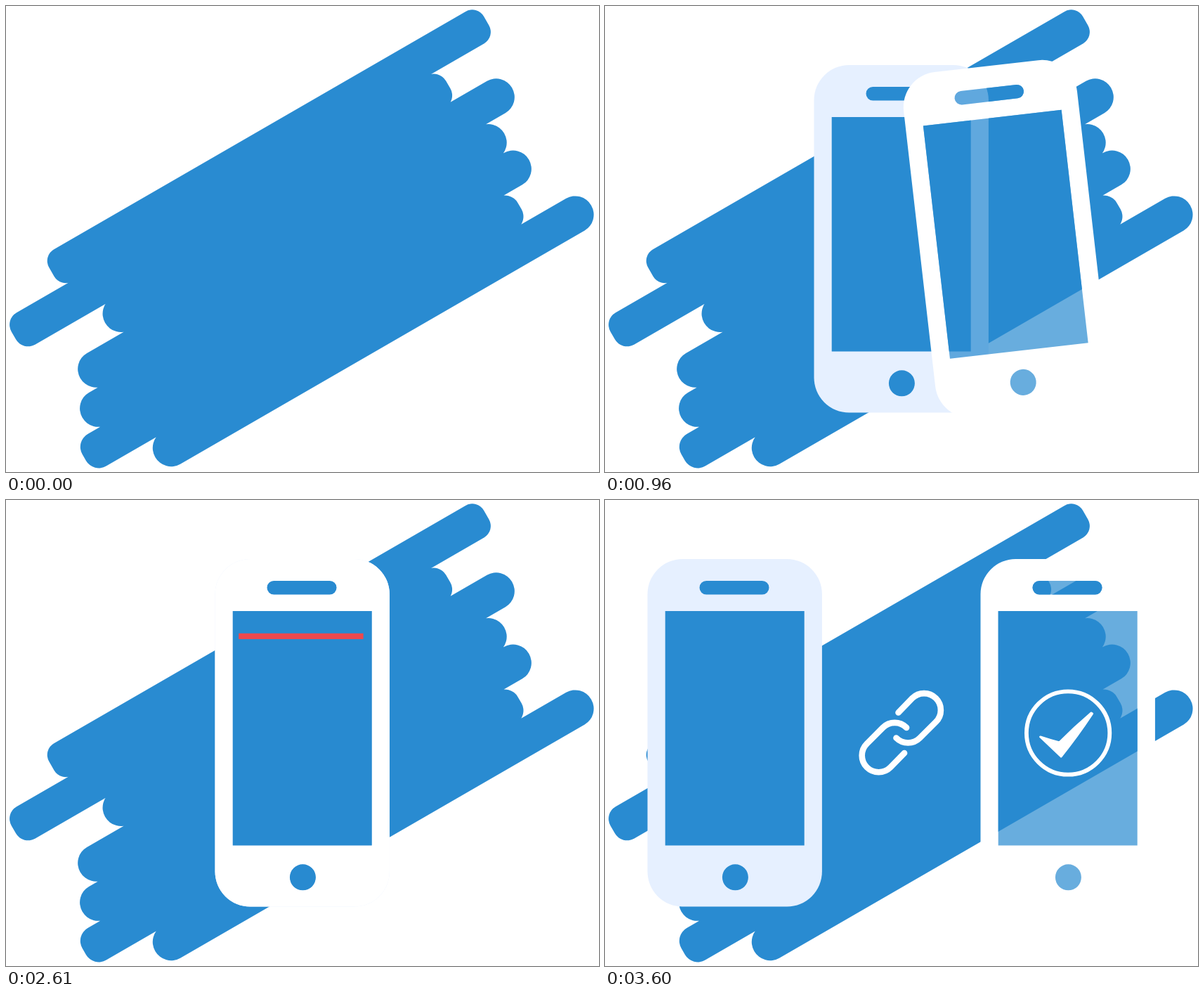
An HTML page with a canvas that plays this animation: 844 px wide and 663 px high, repeating every 4.5 s.

```html
<!DOCTYPE html>
<html lang="en">
<head>
<meta charset="utf-8">
<title>Phone scan</title>
<style>
  html, body { margin: 0; width: 100%; height: 100%; overflow: hidden; background: #fff; }
  canvas { display: block; }
</style>
</head>
<body>
<canvas id="stage" width="844" height="663"></canvas>
<script>
const ctx = document.getElementById('stage').getContext('2d');
const LOOP = 4500, STEP = 30;
const BLUE = '#298bd1', PALE = '#e6f0ff', WHITE = '#fff', RED = '#ff4343';
const CENTER = { x: 421.7, y: 331.2 };
const SPLIT = 237;

// Brush strokes in axes turned by 30 degrees: left, right, top, bottom, corner radius
const STROKES = [
  [-133, 581.5, 333.9, 386.5, 19],
  [-225, 489, 385.3, 437.8, 20],
  [-103.2, 565.5, 434.8, 487.2, 26],
  [-173.2, 523.5, 485.3, 537.7, 26],
  [-198.7, 535.2, 535.3, 587.7, 26],
  [-224.8, 490.8, 585.6, 638.2, 21],
  [-137, 579.5, 635.8, 688.4, 26]
];

const clamp = v => Math.min(1, Math.max(0, v));
const progress = (t, from, to) => clamp((t - from) / (to - from));
const mix = (a, b, p) => a + (b - a) * p;

function place(x, y, angle, alpha, draw) {
  ctx.save();
  ctx.translate(x, y);
  ctx.rotate(angle);
  ctx.globalAlpha = alpha;
  draw();
  ctx.restore();
}

function drawStrokes() {
  ctx.fillStyle = BLUE;
  ctx.beginPath();
  for (const [l, r, t, b, radius] of STROKES) ctx.roundRect(l, t, r - l, b - t, radius);
  ctx.fill();
}

function phoneParts() {
  const parts = new Path2D();
  parts.rect(-99, -173.2, 198, 333.5);
  parts.roundRect(-50.2, -216.2, 99, 19.5, 9.75);
  parts.moveTo(19.2, 205.6);
  parts.arc(0.7, 205.6, 18.5, 0, 2 * Math.PI);
  return parts;
}

const PARTS = phoneParts();
const BODY = new Path2D();
BODY.roundRect(-124.2, -247.2, 248.4, 494.6, 50);
const FRAME = new Path2D(BODY);
FRAME.addPath(PARTS);

function drawSolidPhone() {
  ctx.fillStyle = PALE;
  ctx.fill(BODY);
  ctx.fillStyle = BLUE;
  ctx.fill(PARTS);
}

function drawGlassPhone() {
  ctx.fillStyle = WHITE;
  ctx.fill(FRAME, 'evenodd');
  ctx.globalAlpha = 0.7;
  ctx.fillStyle = BLUE;
  ctx.fill(PARTS);
}

function drawCheck() {
  ctx.strokeStyle = ctx.fillStyle = WHITE;
  ctx.lineWidth = 5.8;
  ctx.beginPath();
  ctx.arc(0, 0, 59.2, 0, 2 * Math.PI);
  ctx.stroke();
  ctx.lineWidth = 3;
  ctx.lineJoin = 'round';
  ctx.beginPath();
  ctx.moveTo(-39.5, 5.5);
  ctx.quadraticCurveTo(-26, 10, -12.5, 13.5);
  ctx.quadraticCurveTo(9, -8, 33, -28.5);
  ctx.lineTo(34.5, -27.5);
  ctx.quadraticCurveTo(13, 5, -10, 33.5);
  ctx.closePath();
  ctx.fill();
  ctx.stroke();
}

function drawLink() {
  ctx.strokeStyle = WHITE;
  ctx.lineWidth = 8.6;
  ctx.lineCap = 'round';
  const q = Math.PI / 4;
  for (let i = 0; i < 2; i++) {
    ctx.beginPath();
    ctx.moveTo(-4.3, -28.8);
    ctx.arc(32.3, -32.3, 23.8, -3 * q, q);
    ctx.arc(9.5, -9.5, 23.8, q, 3 * q);
    ctx.stroke();
    ctx.rotate(Math.PI);
  }
}

function drawScanLine(t) {
  const alpha = progress(t, 1170, 1380) * (1 - progress(t, 2580, 2940));
  const travel = progress(t, 1380, 1800) - progress(t, 1980, 2400) + progress(t, 2580, 2940);
  place(331.2, mix(165.1, 460.8, travel), 0, alpha, () => {
    ctx.fillStyle = RED;
    ctx.fillRect(0, 0, 177.4, 8.2);
  });
}

function render(t) {
  ctx.fillStyle = WHITE;
  ctx.fillRect(0, 0, 844, 663);
  place(0, 0, -Math.PI / 6, 1, drawStrokes);

  const split = SPLIT * progress(t, 3002, 3227);
  const backX = CENTER.x + mix(558, 0, progress(t, 60, 480)) - split;
  if (t > 60) place(backX, CENTER.y, 0, 1, drawSolidPhone);

  // The front phone straightens in proportion to the distance left
  const gap = Math.max(0, 1157.6 - t) * 0.7557;
  if (t > 300) place(CENTER.x + gap + split, CENTER.y, -gap * 0.000766, 1, drawGlassPhone);

  drawScanLine(t);
  const checkX = CENTER.x + SPLIT * progress(t, 2914, 3227);
  place(checkX + 0.4, 331.5, 0, progress(t, 2760, 2910), drawCheck);
  place(421.8, 331.2, 0, progress(t, 3180, 3600), drawLink);
}

function tick() {
  const t = performance.now() % LOOP;
  render(Math.floor(t / STEP) * STEP);
  requestAnimationFrame(tick);
}
tick();
</script>
</body>
</html>
```
